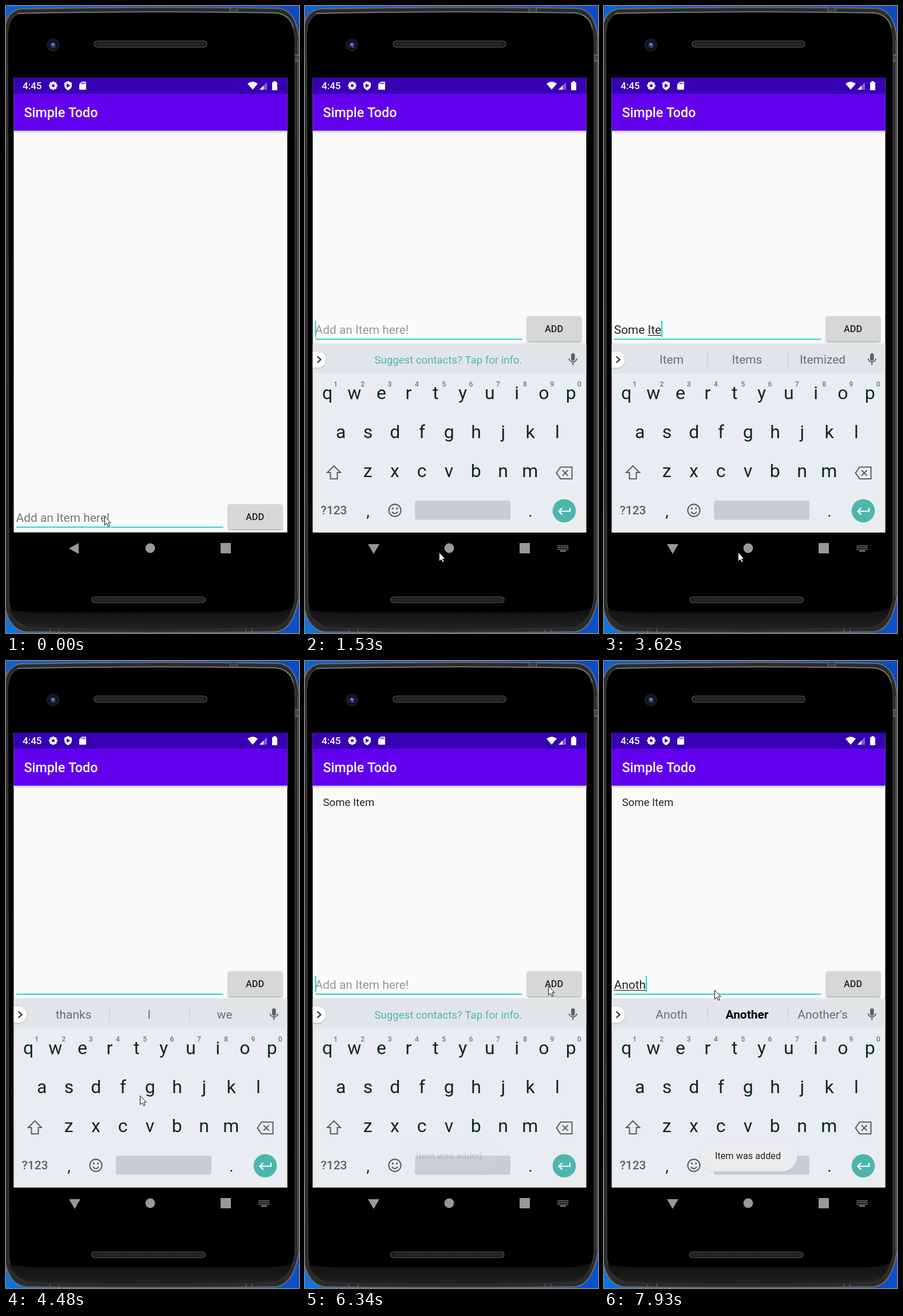
Recreate the animation shown at these times as an HTML page with a canvas. Size 512 by 1094 pixels, loop 8000 ms.

```html
<!DOCTYPE html>
<html lang="en">
<head>
<meta charset="utf-8">
<title>Simple Todo</title>
<style>
html, body { margin: 0; width: 100%; height: 100%; overflow: hidden; background: #000; }
canvas { display: block; width: 512px; height: 1094px; }
</style>
</head>
<body>
<canvas id="stage"></canvas>
<script>
const W = 512, H = 1094, LOOP = 8000;
const canvas = document.getElementById('stage');
const dpr = window.devicePixelRatio || 1;
canvas.width = W * dpr;
canvas.height = H * dpr;
const ctx = canvas.getContext('2d');

const SP = 1.163; // device pixels per sp
const TEAL = '#1fd2c1', KEY_TEAL = '#4db6ac', KEY_INK = '#0d2530', KEY_GREY = '#56636a';
const INFO = ['', 'Suggest contacts? Tap for info.', ''];
const NEXT = ['thanks', 'I', 'we'];
const ITEM = ['Item', 'Items', 'Itemized'];

// Each step changes part of the state from its time on.
const steps = [
  [0, { mouse: [172, 890], keyboard: false, slide: 0, text: '', hint: true, caret: false, words: INFO, item: false, pressed: false, toast: 0 }],
  [120, { mouse: [175, 926], keyboard: true, slide: 45, caret: true }],
  [270, { mouse: [180, 958], slide: 1 }],
  [420, { mouse: [212, 956], slide: 0 }],
  [570, { mouse: [234, 953] }],
  [1000, { caret: false }],
  [1530, { caret: true }],
  [2090, { caret: false }],
  [2490, { caret: true, text: 'S', hint: false }],
  [2770, { text: 'Som', words: ['Som', 'Some', 'Someone'] }],
  [2890, { text: 'Some', words: ['Some', 'Something', 'Someone'] }],
  [3040, { text: 'Some ', words: NEXT }],
  [3320, { text: 'Some I' }],
  [3470, { text: 'Some It', words: ['It', 'Item', 'Its'] }],
  [3620, { text: 'Some Ite', words: ITEM }],
  [3770, { text: 'Some Item' }],
  [3920, { text: 'Some Item ', words: NEXT, caret: false }],
  [4480, { text: '', mouse: [234, 758] }],
  [4600, { text: 'Some Item ', mouse: [234, 645] }],
  [4750, { mouse: [234, 552] }],
  [5030, { text: 'Some Item', caret: true }],
  [5280, { words: ITEM }],
  [5680, { mouse: [379, 517], caret: false }],
  [5800, { mouse: [422, 546] }],
  [5920, { mouse: [433, 562] }],
  [6070, { pressed: true }],
  [6190, { pressed: false, item: true, text: '', hint: true, caret: true }],
  [6310, { words: INFO, mouse: [425, 567], toast: 0.15 }],
  [6430, { mouse: [365, 571], toast: 0.45 }],
  [6580, { mouse: [285, 572], toast: 0.75 }],
  [6730, { mouse: [225, 573], toast: 0.93 }],
  [6880, { mouse: [193, 574], toast: 1, caret: false }],
  [7250, { caret: true }],
  [7500, { text: 'A', hint: false }],
  [7780, { text: 'Ano', words: ['Ano', '*Another', 'Anon'] }],
  [7930, { text: 'Anoth', words: ['Anoth', '*Another', "Another's"] }]
];

function stateAt(t) {
  const state = {};
  for (const [start, change] of steps) if (start <= t) Object.assign(state, change);
  return state;
}

function rect(x, y, w, h, fill) {
  ctx.fillStyle = fill;
  ctx.fillRect(x, y, w, h);
}

function pill(x, y, w, h, r, fill, stroke) {
  ctx.beginPath();
  ctx.roundRect(x, y, w, h, r);
  if (fill) { ctx.fillStyle = fill; ctx.fill(); }
  if (stroke) { ctx.strokeStyle = stroke; ctx.stroke(); }
}

function disc(x, y, r, fill) {
  ctx.beginPath();
  ctx.arc(x, y, r, 0, Math.PI * 2);
  ctx.fillStyle = fill;
  ctx.fill();
}

function shape(d, fill, stroke, width = 2) {
  const path = new Path2D(d);
  if (fill) { ctx.fillStyle = fill; ctx.fill(path); }
  if (stroke) { ctx.strokeStyle = stroke; ctx.lineWidth = width; ctx.stroke(path); }
}

function label(str, x, y, size, color, weight = 400, align = 'left') {
  ctx.font = `${weight} ${size}px Roboto, sans-serif`;
  ctx.textAlign = align;
  ctx.fillStyle = color;
  ctx.fillText(str, x, y);
}

function gradient(x0, y0, x1, y1, ...colors) {
  const g = ctx.createLinearGradient(x0, y0, x1, y1);
  colors.forEach((c, i) => g.addColorStop(i / (colors.length - 1), c));
  return g;
}

function withShadow(color, blur, dy, draw) {
  ctx.save();
  ctx.shadowColor = color;
  ctx.shadowBlur = blur * dpr;
  ctx.shadowOffsetY = dy * dpr;
  draw();
  ctx.restore();
}

function speaker(x, y, w, h) {
  ctx.lineWidth = 1.2;
  pill(x, y, w, h, h / 2, '#1b1b1b', '#5c5c5c');
  for (let i = x + 6; i < x + w - 5; i += 3) rect(i, y + 3, 1, h - 6, '#3c3c3c');
}

function drawPhone() {
  rect(0, 0, W, H, gradient(0, 0, W, 0, '#0a62d6', '#0a58cc', '#0b4cc4'));
  rect(0, 1030, W, 64, gradient(0, 0, W, 0, '#0a76e2', '#0a5fd0', '#0a50c8'));
  const body = 'M-3 45 Q-1 9 26 5 Q250 0 474 4 Q508 5 512 60 V1030 Q503 1088 472 1092 Q250 1095 34 1092 Q4 1088 -3 1042 Z';
  shape(body, '#2b2b2b', '#6c6c6c', 2);
  shape('M3 55 Q2 16 28 12 Q250 8 476 12 Q501 15 505 55 V1036 Q498 1075 470 1082 Q250 1087 34 1082 Q10 1076 5 1040 Z', '#000', '#454545', 1.2);
  shape('M20 13 Q250 8 470 12 Q496 14 502 38', null, '#8b8b8b', 1.4);
  shape('M6 1052 Q20 1057 60 1058 H455 Q486 1057 500 1050 Q494 1076 470 1083 Q250 1090 38 1083 Q14 1077 6 1052 Z',
    gradient(0, 1052, 0, 1088, '#111', '#222'));
  rect(509, 60, 3, 970, '#4c4c4c');
  rect(505, 85, 7, 12, '#4a4a4a');
  for (const y of [85, 96]) rect(505, y, 7, 1, '#888');
  rect(392, 3, 12, 7, '#3d3d3d');
  for (const x of [391, 404]) rect(x, 3, 1, 7, '#777');
  for (const x of [76, 92, 419, 429]) rect(x, 1087, 1, 6, '#777');
  speaker(154, 61, 197, 11);
  speaker(150, 1031, 198, 10);
  disc(82, 68, 11, '#1d1b1b');
  disc(82, 68, 8, '#10131f');
  disc(82, 68, 5, '#26356e');
  disc(82, 67, 2, '#8ea2e0');
  disc(84, 71, 1.2, '#5a6cb5');
}

function drawStatus() {
  rect(13.5, 125, 478, 28, '#3700b3');
  label('4:45', 29, 145, 17, '#fff', 500);
  for (let i = 0; i < 8; i++) {
    ctx.save();
    ctx.translate(82.5, 139);
    ctx.rotate(i * Math.PI / 4);
    rect(-1.9, -7.3, 3.8, 4, '#fff');
    ctx.restore();
  }
  disc(82.5, 139, 5.5, '#fff');
  disc(82.5, 139, 2.5, '#3700b3');
  shape('M108.5 131 L115 134 V139 Q114.5 144.5 108.5 147 Q102.5 144.5 102 139 V134 Z', '#fff');
  shape('M106 135.3 L112.5 139 L106 142.7 Z', '#3700b3');
  shape('M132.5 132 H139 Q140 132 140 133 V145 Q140 146 139 146 H129 Q128 146 128 145 V136.5 Z', '#fff');
  for (const x of [132, 134.5, 137]) rect(x, 133.5, 1.3, 3, '#3700b3');
  shape('M422 135.5 Q431 128.5 440 135.5 L431 146 Z', '#fff');
  shape('M456 133 V146 H443 Z', 'rgba(255,255,255,.38)');
  shape('M450 139 V146 H443 Z', '#fff');
  pill(465, 133, 9, 14, 1, '#fff');
  rect(467.5, 131, 4, 3, '#fff');
}

function drawScreen(s) {
  rect(13.5, 125, 478, 793.5, '#fafafa');
  rect(13.5, 217, 478, 6, gradient(0, 217, 0, 223, '#c9c9cc', '#fafafa'));
  drawStatus();
  rect(13.5, 153, 478, 64.5, '#6200ee');
  label('Simple Todo', 31.5, 194, 20 * SP, '#fff', 500);
  if (s.item) label('Some Item', 31.5, 252.5, 16 * SP, '#232323');
  ctx.save();
  if (s.keyboard) ctx.translate(0, -328);
  drawField(s);
  ctx.restore();
  if (s.keyboard) {
    ctx.save();
    ctx.beginPath();
    ctx.rect(13.5, 580, 478, 338.5);
    ctx.clip();
    ctx.translate(0, s.slide);
    drawKeyboard(s);
    ctx.restore();
  }
  if (s.toast) drawToast(s.toast);
}

function drawField(s) {
  const size = 18 * SP, left = 17.5, base = 900;
  rect(18, 908.4, 361.5, 2, TEAL);
  if (s.hint) label('Add an Item here!', left, base, size, s.keyboard ? '#979797' : '#757575');
  label(s.text, left, base, size, '#222');
  const end = left + ctx.measureText(s.text).width;
  const wordStart = s.text.lastIndexOf(' ') + 1;
  const from = left + ctx.measureText(s.text.slice(0, wordStart)).width;
  if (wordStart < s.text.length) rect(from, 902, end - from, 1.2, '#222');
  if (s.caret) rect(end, 877.5, 2, 28.5, TEAL);
  withShadow('rgba(0,0,0,.4)', 3, 1.2, () => pill(388.5, 869.5, 94, 43.5, 2, s.pressed ? '#bfc0c0' : '#d6d7d7'));
  label('ADD', 435, 897, 14 * SP, '#212121', 500, 'center');
}

function drawSuggestions(words) {
  rect(13.5, 590, 478, 51.5, '#e1e5e8');
  withShadow('rgba(0,0,0,.2)', 3, 1, () => pill(0, 603, 36.5, 28, 14, '#fff'));
  shape('M21.5 611.5 L27.5 617 L21.5 622.5', null, '#263238', 2.2);
  if (words === INFO) {
    label(words[1], 250.5, 624, 16 * SP, KEY_TEAL, 400, 'center');
  } else {
    words.forEach((word, i) => {
      const strong = word[0] === '*';
      label(word.replace('*', ''), 118 + 132 * i, 624, 18 * SP, strong ? '#000' : '#636e74', strong ? 700 : 400, 'center');
    });
    for (const x of [180.5, 320.5]) rect(x, 602, 1, 28, '#c3c9cc');
  }
  pill(465, 606, 6.5, 13, 3.2, KEY_GREY);
  shape('M461.5 615 A6.8 6.8 0 0 0 475 615 M468.2 622 V626.5', null, KEY_GREY, 2);
}

function drawKeyboard(s) {
  rect(13.5, 586, 478, 4, gradient(0, 586, 0, 590, 'rgba(0,0,0,0)', 'rgba(0,0,0,.08)'));
  rect(13.5, 590, 478, 330, '#e9edf0');
  drawSuggestions(s.words);
  const rows = [['qwertyuiop', 39], ['asdfghjkl', 62.6], ['zxcvbnm', 109.6]];
  rows.forEach(([keys, x], row) => {
    [...keys].forEach((key, i) => {
      const cx = x + 47.3 * i;
      label(key, cx, 685.5 + 68.3 * row, 32, KEY_INK, 400, 'center');
      if (row === 0) label((i + 1) % 10, cx + 14.5, 663.5, 12.5, '#6b777d', 500, 'center');
    });
  });
  shape('M50.5 802.5 L62 814 H56.5 V825 H44.5 V814 H39 Z', null, KEY_GREY, 2.1);
  shape('M446.5 804.5 H466.5 V825 H446.5 L439.5 814.7 Z M450 810 L459.5 819.5 M459.5 810 L450 819.5', null, KEY_GREY, 2.1);
  label('?123', 50.5, 887, 18 * SP, KEY_GREY, 500, 'center');
  label(',', 110, 890.5, 28, KEY_INK, 400, 'center');
  label('.', 394, 891, 28, KEY_INK, 400, 'center');
  shape('M146.4 880 A10.6 10.6 0 1 1 167.6 880 A10.6 10.6 0 1 1 146.4 880 Z M151.8 882.5 Q157 889 162.2 882.5', null, KEY_GREY, 2.1);
  disc(153.3, 876.8, 1.7, KEY_GREY);
  disc(160.7, 876.8, 1.7, KEY_GREY);
  pill(192, 863, 167, 33.5, 4, '#c9cdd0');
  disc(453, 880.7, 20.3, KEY_TEAL);
  shape('M463 875.5 V881.5 H444 M449.5 875.5 L443.5 881.5 L449.5 887.5', null, '#fff', 2.2);
}

function drawToast(alpha) {
  ctx.save();
  ctx.globalAlpha = alpha;
  withShadow('rgba(0,0,0,.06)', 4, 1, () => pill(169, 835.5, 169, 55, 27.5, '#ebeced'));
  label('Item was added', 194, 868.5, 14 * SP, '#222');
  ctx.restore();
}

function drawNav(keyboard) {
  const grey = '#989898';
  shape(keyboard ? 'M110 939 H130 L120 956 Z' : 'M127 937 V956 L110 946.5 Z', grey);
  disc(252, 946, 8.4, grey);
  rect(375, 937, 18, 18, grey);
  if (!keyboard) return;
  for (let row = 0; row < 3; row++) {
    for (let i = 0; i < 7; i++) rect(441.5 + i * 2.8, 941 + row * 3.2, 1.8, 1.8, grey);
  }
  rect(446, 950, 10, 1.8, grey);
}

function drawMouse([x, y]) {
  ctx.save();
  ctx.translate(x + 0.5, y + 0.5);
  shape('M0 0 V15.5 L3.6 12.2 L6.2 17.5 L8.6 16.5 L6.2 11.3 H10.6 Z', '#fff', '#111', 1);
  ctx.restore();
}

function frame(now) {
  const s = stateAt(now % LOOP);
  ctx.setTransform(dpr, 0, 0, dpr, 0, 0);
  drawPhone();
  drawScreen(s);
  drawNav(s.keyboard);
  drawMouse(s.mouse);
}

const start = performance.now();
function tick() {
  frame(performance.now() - start);
  requestAnimationFrame(tick);
}
tick();
</script>
</body>
</html>
```
